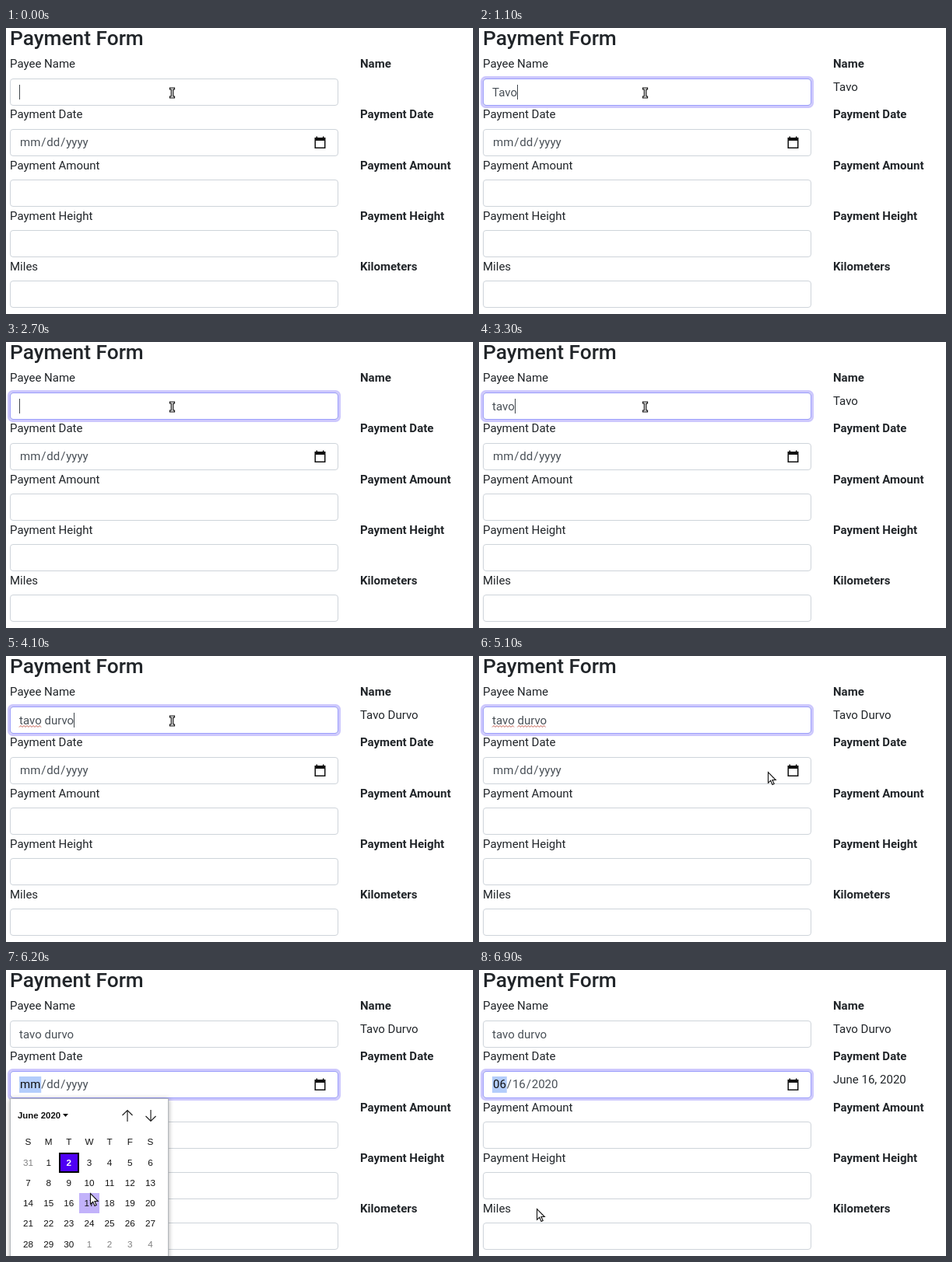
These frames come from a looping animation (600 by 368 pixels, 8000 ms). An HTML page:

```html
<!DOCTYPE html>
<html lang="en">
<head>
<meta charset="utf-8">
<title>Payment Form</title>
<style>
  html, body { margin: 0; width: 100%; height: 100%; overflow: hidden; background: #fff; }
  svg { display: block; width: 600px; height: 368px; }
  text { font: 15px Roboto, sans-serif; fill: #212529; white-space: pre; }
  .title { font-size: 26.3px; font-weight: 500; }
  .bold { font-weight: 700; }
  .value { fill: #495057; }
  .box { fill: #fff; stroke: #ced4da; }
  .picked { fill: #111; }
  .mark { fill: #b3cdfb; }
  .ring { fill: none; stroke: #cdc8fd; stroke-width: 3; }
  .edge { fill: none; stroke: #9c9ffb; }
  .wave { fill: none; stroke: #c4584a; stroke-width: 1; }
  #popup text { font: 11.7px "Liberation Sans", Arial, sans-serif; fill: #111; text-anchor: middle; }
  #popup .month { font-size: 11.4px; font-weight: 700; text-anchor: start; }
  #popup .other { fill: #808080; }
  #popup .on { fill: #fff; font-weight: 700; }
  .arrows { fill: none; stroke: #222; stroke-width: 1.2; }
  .panel { fill: #fff; stroke: #b4b8bc; filter: drop-shadow(0 1px 3px rgba(0, 0, 0, .35)); }
</style>
</head>
<body>
<svg id="stage" viewBox="0 0 600 368">
  <text class="title" x="5" y="22">Payment Form</text>
  <g id="form"></g>
  <g id="focus0"><rect class="ring" x="3.5" y="63.5" width="425" height="38" rx="5"/><rect class="edge" x="5.5" y="65.5" width="421" height="34" rx="3.5"/></g>
  <g id="focus1"><rect class="ring" x="3.5" y="128.5" width="425" height="38" rx="5"/><rect class="edge" x="5.5" y="130.5" width="421" height="34" rx="3.5"/></g>
  <rect id="selection" class="mark" x="17" y="73" height="19"/>
  <text id="name" class="value" x="17.1" y="88"></text>
  <path id="wave0" class="wave"/>
  <path id="wave1" class="wave"/>
  <rect id="caret" y="73" width="1" height="19" fill="#40464c"/>
  <text id="nameOut" x="455" y="81"></text>
  <rect id="dateMark" class="mark" x="17" y="137" height="21"/>
  <text class="value" x="18" y="152"><tspan id="mm"></tspan><tspan dx=".9">/</tspan><tspan id="dd" dx=".9"></tspan><tspan dx=".9">/</tspan><tspan id="yyyy" dx=".9"></tspan></text>
  <text id="dateOut" x="455" y="146">June 16, 2020</text>
  <path d="M396.5 141h2v-1.6h1.6v1.6h6.8v-1.6h1.6v1.6h2v14h-14zM398 145v8.5h11v-8.5z" fill="#111" fill-rule="evenodd"/>
  <g id="popup">
    <rect class="panel" x="5.5" y="165.5" width="203" height="215"/>
    <g id="month">
      <text class="month" x="15" y="191">June 2020</text>
      <path d="M73 185h7l-3.5 4z" fill="#111"/>
      <path class="arrows" d="M156 195v-14.500m-6.500 6.500l6.500-6.500l6.500 6.500M186 180v14.500m-6.500-6.500l6.500 6.500l6.500-6.500"/>
      <g id="days"></g>
    </g>
  </g>
  <path id="beam" d="M-3-6.500h6v2h-1.800v9h1.800v2h-6v-2h1.800v-9h-1.800z" fill="#fff" stroke="#111" stroke-width="1.2"/>
  <path id="arrow" d="M.5.5v13.800l3.200-3l2.300 5.200l2.200-1l-2.300-5h4.400z" fill="#fff" stroke="#111" stroke-width="1.1"/>
</svg>
<script>
const LOOP = 8000;
const $ = id => document.getElementById(id);
const pen = document.createElement('canvas').getContext('2d');
pen.font = '15px Roboto, sans-serif';
const width = s => pen.measureText(s).width;

function add(parent, tag, attrs, label = '') {
  const el = document.createElementNS('http://www.w3.org/2000/svg', tag);
  for (const key in attrs) el.setAttribute(key, attrs[key]);
  el.textContent = label;
  return parent.appendChild(el);
}
const show = (id, on) => $(id).style.display = on ? '' : 'none';

// Form rows
const labels = ['Payee Name', 'Payment Date', 'Payment Amount', 'Payment Height', 'Miles'];
const heads = ['Name', 'Payment Date', 'Payment Amount', 'Payment Height', 'Kilometers'];
labels.forEach((label, i) => {
  const y = Math.round(51 + 65.25 * i);
  add($('form'), 'text', { x: 5, y }, label);
  add($('form'), 'text', { x: 455, y, class: 'bold' }, heads[i]);
  add($('form'), 'rect', { class: 'box', x: 5.5, y: 65.5 + Math.floor(65.2 * i), width: 421, height: 34, rx: 3.5 });
});

// Calendar
const CELL = 26.15;
[...'SMTWTFS'].forEach((d, c) => add($('days'), 'text', { x: 28.5 + CELL * c, y: 225 }, d));
const cells = [];
for (let i = 0; i < 35; i++) {
  const x = 28.5 + CELL * (i % 7), y = 248 + CELL * Math.floor(i / 7);
  const other = i < 1 || i > 30;
  const day = i < 1 ? 31 : other ? i - 30 : i;
  cells.push({
    x, y, other,
    back: add($('days'), 'rect', {}),
    text: add($('days'), 'text', { x, y: y + 4 }, day)
  });
}

function paintDays(chosen, mx, my) {
  cells.forEach((cell, i) => {
    const on = i === chosen;
    const over = Math.abs(mx - cell.x) < CELL / 2 && Math.abs(my - cell.y) < CELL / 2;
    const inset = on ? 1 : .5;
    const set = (k, v) => cell.back.setAttribute(k, v);
    set('x', Math.round(cell.x - 13) + inset);
    set('y', Math.round(cell.y - 13.4) + inset);
    set('width', 26 - 2 * inset);
    set('height', 26 - 2 * inset);
    set('fill', on ? '#4f00f5' : over ? '#c2b2fa' : 'none');
    set('stroke', on ? '#000' : i === 2 ? '#4f00f5' : over ? '#c2b2fa' : 'none');
    set('stroke-width', 2 * inset);
    cell.text.setAttribute('class', on ? 'on' : cell.other ? 'other' : '');
  });
}

// Typing: [time, letters shown]
const FULL = 'Tavo Durvo', LOWER = FULL.toLowerCase();
const typed = [[0, 0], [700, 1], [900, 2], [1100, 4], [1400, 5], [1600, 6], [1800, 7], [1900, 8], [2000, 9], [2100, 10],
  [2700, 0], [3000, 1], [3200, 2], [3300, 4], [3500, 5], [3600, 6], [3700, 7], [3800, 8], [4000, 9], [4100, 10]];
// Pointer: [time, x, y]
const pointer = [[0, 213.5, 83.5], [4700, 222, 86], [4800, 255, 103], [4900, 300, 123], [5000, 344, 141], [5100, 371, 149],
  [5200, 390, 147], [5300, 402, 144], [5400, 406, 142], [5800, 386, 151], [5900, 320, 186], [6000, 232, 235],
  [6100, 150, 272], [6200, 108, 287], [6400, 92, 297], [6500, 74, 307]];
const at = (list, t) => list.filter(step => step[0] <= t).pop();

function wave(id, from, to) {
  let d = `M${from} 91.500`;
  for (let x = from, up = true; x + 2 <= to; x += 2, up = !up) d += `l2 ${up ? -2 : 2}`;
  $(id).setAttribute('d', d);
}
wave('wave0', 17, 17 + width(LOWER.slice(0, 4)));
wave('wave1', 17 + width(LOWER.slice(0, 5)), 17 + width(LOWER));

function draw(t) {
  const n = at(typed, t)[1];
  const value = (t < 2700 ? FULL : LOWER).slice(0, n);
  const selected = t >= 2400 && t < 2700;
  $('name').textContent = value;
  $('nameOut').textContent = FULL.slice(0, n);
  $('caret').setAttribute('x', Math.round(17 + width(value)));
  $('selection').setAttribute('width', selected ? width(FULL) + 1 : 0);
  show('caret', t < 4700 && !selected);
  show('wave0', t >= 3500 && t < 5500);
  show('wave1', t >= 4700 && t < 5500);
  $('focus0').style.opacity = t < 100 || t >= 5500 ? 0 : t < 200 || t >= 5400 ? .5 : 1;
  $('focus1').style.opacity = t < 5400 ? 0 : t < 5500 ? .5 : 1;

  const done = t >= 6900;
  const [mm, dd, yyyy] = done ? ['06', '16', '2020'] : ['mm', 'dd', 'yyyy'];
  Object.entries({ mm, dd, yyyy }).forEach(([id, s]) => $(id).textContent = s);
  $('mm').setAttribute('class', t >= 5500 ? 'picked' : '');
  $('dateMark').setAttribute('width', t >= 5500 ? width(mm) + 1.9 : 0);
  show('dateOut', done);

  const [, x, y] = at(pointer, t);
  const open = t >= 5500 && !done;
  show('popup', open);
  show('month', t >= 5600);
  // the hot spot lies just below the drawn tip
  if (open) paintDays(t < 6700 ? 2 : 16, x + 1, y + 2);
  const beam = t < 4800;
  show('beam', beam);
  show('arrow', !beam);
  $(beam ? 'beam' : 'arrow').setAttribute('transform', `translate(${x} ${y})`);
}

const start = performance.now();
function tick() {
  draw((performance.now() - start) % LOOP);
  requestAnimationFrame(tick);
}
tick();
</script>
</body>
</html>
```
